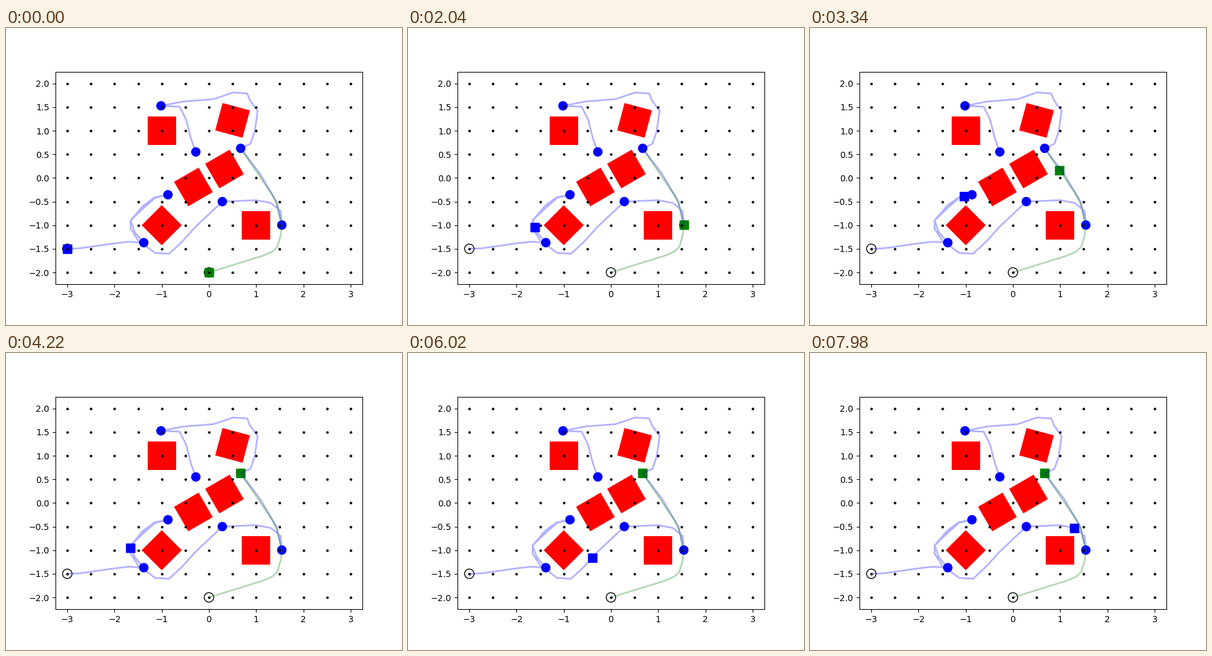
Recreate the animation shown at these times as a matplotlib script. Size 640 px wide and 480 px high, loop 8000 ms.

```python
import numpy as np
import matplotlib.pyplot as plt
from matplotlib.animation import FuncAnimation
from matplotlib.patches import Circle, Rectangle

INTERVAL = 20              # ms
FRAMES = 400
SPEED = 1.0                # units per second

BLUE_START, GREEN_START = (-3, -1.5), (0, -2)
A, B, C, D = (-1.38, -1.37), (-0.868, -0.355), (0.283, -0.5), (1.543, -0.997)
E, F, G = (0.672, 0.628), (-1.016, 1.528), (-0.278, 0.552)
BEND = (-1.66, -0.9)       # passed on the way to B and back

BLUE = np.array([
    BLUE_START, (-2.74, -1.49), (-2, -1.385), (-1.7, -1.35), A,
    (-1.57, -1.15), BEND, (-1.39, -0.64), (-1.14, -0.42), B,
    (-1.15, -0.41), (-1.39, -0.585), BEND, (-1.66, -1.07), (-1.5, -1.32),
    (-1.14, -1.587), (-0.845, -1.605), (-0.56, -1.34), (-0.29, -1.04), C,
    (1, -0.47), (1.31, -0.53), (1.52, -0.7), D,
    (1.43, -0.5), (1.08, 0.09), E,
    (0.88, 0.726), (0.97, 0.99), (1.03, 1.42), (0.87, 1.64), (0.81, 1.79),
    (0.51, 1.81), (0.1, 1.67), (-0.54, 1.62), F,
    (-0.62, 1.51), (-0.485, 1.24), (-0.38, 0.83), G,
])
GREEN = np.array([
    GREEN_START, (1.13, -1.65), (1.34, -1.56), (1.45, -1.455),
    (1.52, -1.21), D, (1.44, -0.56), (1.34, -0.36), E,
])


def position(path, dist):
    """Point at a given arc length, resting at the end of the path."""
    steps = np.hypot(*np.diff(path, axis=0).T)
    length = np.concatenate([[0], np.cumsum(steps)])
    return [np.interp(dist, length, axis) for axis in path.T]


def add_obstacle(x, y, angle):
    ax.add_patch(Rectangle((x - 0.3, y - 0.3), 0.6, 0.6, angle=angle,
                           rotation_point="center", color="red", lw=0))


fig, ax = plt.subplots(figsize=(6.4, 4.8), dpi=100)
ax.set_aspect("equal")
ax.set_xlim(-3.25, 3.25)
ax.set_ylim(-2.25, 2.25)

for x, y, angle in [(-1, 1, 0), (1, -1, 0), (-1, -1, 45), (0.5, 1.22, -15)]:
    add_obstacle(x, y, angle)
for side in (-1, 1):
    add_obstacle(side * 0.329, side * 0.19, 30)
for goal in (A, B, C, D, E, F, G):
    ax.add_patch(Circle(goal, 0.1, color="blue", lw=0))
for start in (BLUE_START, GREEN_START):
    ax.add_patch(Circle(start, 0.1, fill=False, ec="black"))

# Robots are added first, so paths and grid dots lie over them.
robots = []
for path, color in ((BLUE, "blue"), (GREEN, "green")):
    marker, = ax.plot([], [], "s", ms=10, color=color)
    robots.append((marker, path))
for path, color in ((BLUE, "blue"), (GREEN, "green")):
    ax.plot(*path.T, color=color, lw=2, alpha=0.3)
gx, gy = np.meshgrid(np.arange(-3, 3.1, 0.5), np.arange(-2, 2.1, 0.5))
ax.plot(gx.ravel(), gy.ravel(), "k.", ms=4)


def update(i):
    dist = SPEED * i * INTERVAL / 1000
    for marker, path in robots:
        x, y = position(path, dist)
        marker.set_data([x], [y])
    return [marker for marker, _ in robots]


anim = FuncAnimation(fig, update, frames=FRAMES, interval=INTERVAL,
                     repeat=True, repeat_delay=0, blit=False)
plt.show()
```
